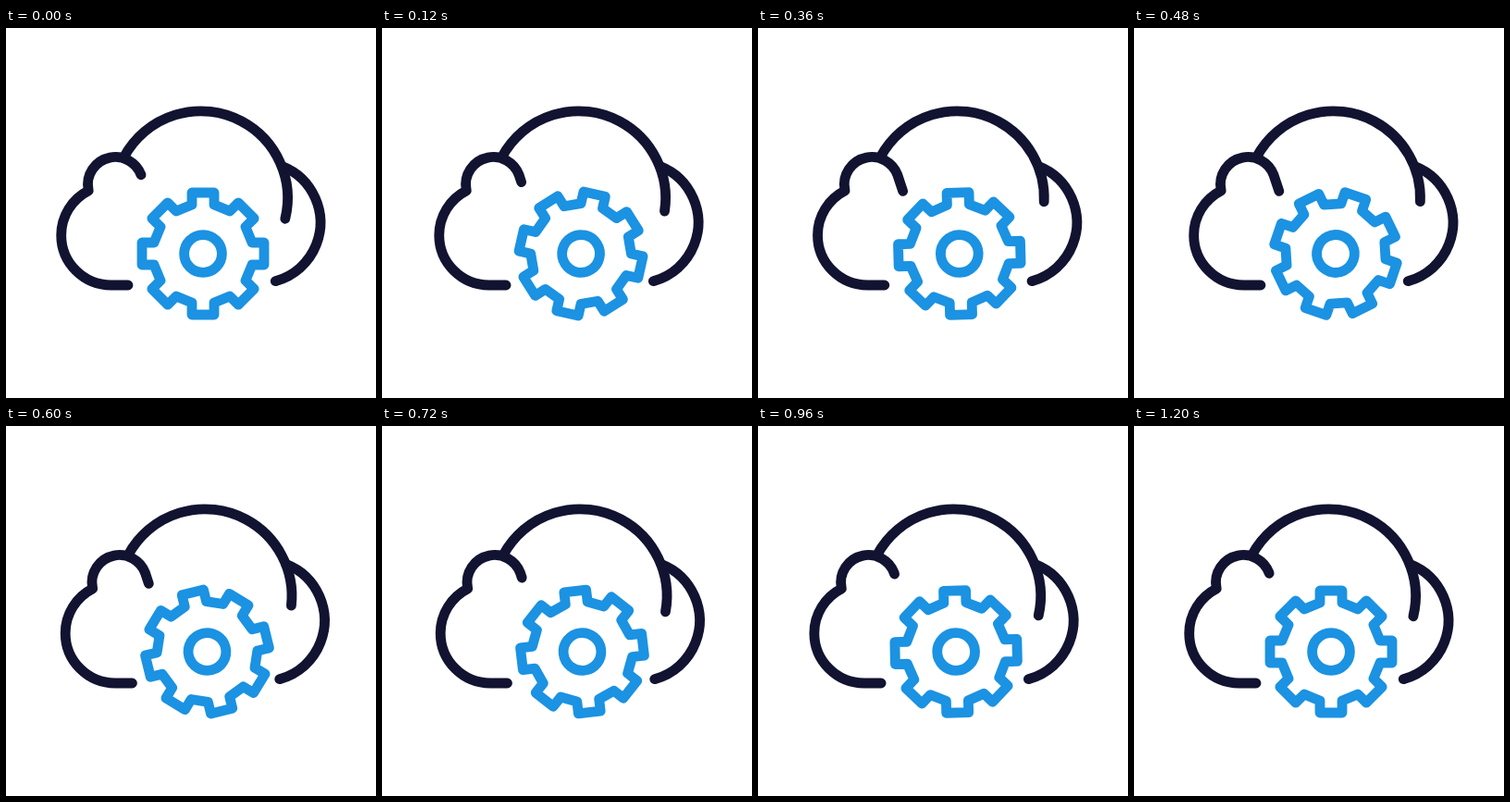
Animation, 400 px wide and 400 px high, one loop 1.26 s. Source, as an HTML page with a canvas:

```html
<!DOCTYPE html>
<html lang="en">
<head>
<meta charset="utf-8">
<title>Cloud settings</title>
<style>
  html, body { margin: 0; width: 100%; height: 100%; overflow: hidden; background: #fff; }
  canvas { display: block; }
</style>
</head>
<body>
<canvas width="400" height="400"></canvas>
<script>
const ctx = document.querySelector('canvas').getContext('2d');
const LOOP = 1260, STEP = 30, END = 1200;
const NAVY = '#121331', BLUE = '#1b92e2';
const { PI, sin, cos, exp, min } = Math;

// Rise with a sine ease-out until the peak, then fall by the given curve.
const pulse = (t, peak, fall) => t < peak ? sin(t / peak * PI / 2) : fall(t - peak);

const slide = t => 5 * pulse(t, 440, d => (1 + cos(PI * d / (END - 440))) / 2);
const stretch = t => pulse(t, 420, d => 1 / (1 + (d / 220) ** 2.9));
const spin = t => {
  const u = t / END;
  return u < 1 ? PI * (1 - exp(-3.55 * u - 3.2 * u * u)) : PI;
};

function stroke(color, build) {
  ctx.strokeStyle = color;
  ctx.beginPath();
  build();
  ctx.stroke();
}

function drawCloud(p) {
  // Left side, then the small bump with its growing straight tail
  stroke(NAVY, () => {
    ctx.moveTo(132, 278);
    ctx.arc(113.7, 224, 54, PI / 2, PI + 1.1);
    ctx.arc(118.2, 169.2, 29.7, PI - 0.2, -0.36);
    ctx.lineTo(146 + 6 * p, 158.8 + 18 * p);
  });
  // Main dome
  stroke(NAVY, () => ctx.arc(210.5, 183.8, 94, PI + 0.49, 0.241 - 0.204 * p));
  // Right side
  stroke(NAVY, () => ctx.arc(274.3, 210.3, 65.6, -1.2, 1.31));
}

function drawGear(angle) {
  ctx.save();
  ctx.translate(213, 244);
  ctx.rotate(angle);
  stroke(BLUE, () => ctx.arc(0, 0, 20.4, 0, 2 * PI));
  stroke(BLUE, () => {
    for (let i = 0; i < 8; i++) {
      const c = cos(i * PI / 4), s = sin(i * PI / 4);
      for (const [x, y] of [[-12, -53], [-12, -66], [12, -66], [12, -53]])
        ctx.lineTo(x * c - y * s, x * s + y * c);
    }
    ctx.closePath();
  });
  ctx.restore();
}

function draw(now) {
  const t = min(Math.floor(now % LOOP / STEP) * STEP, END);
  ctx.fillStyle = '#fff';
  ctx.fillRect(0, 0, 400, 400);
  ctx.lineWidth = 10.8;
  ctx.lineCap = ctx.lineJoin = 'round';
  ctx.save();
  ctx.translate(slide(t), 0);
  drawCloud(stretch(t));
  drawGear(spin(t));
  ctx.restore();
}

const start = performance.now();
(function tick() {
  draw(performance.now() - start);
  requestAnimationFrame(tick);
})();
</script>
</body>
</html>
```
